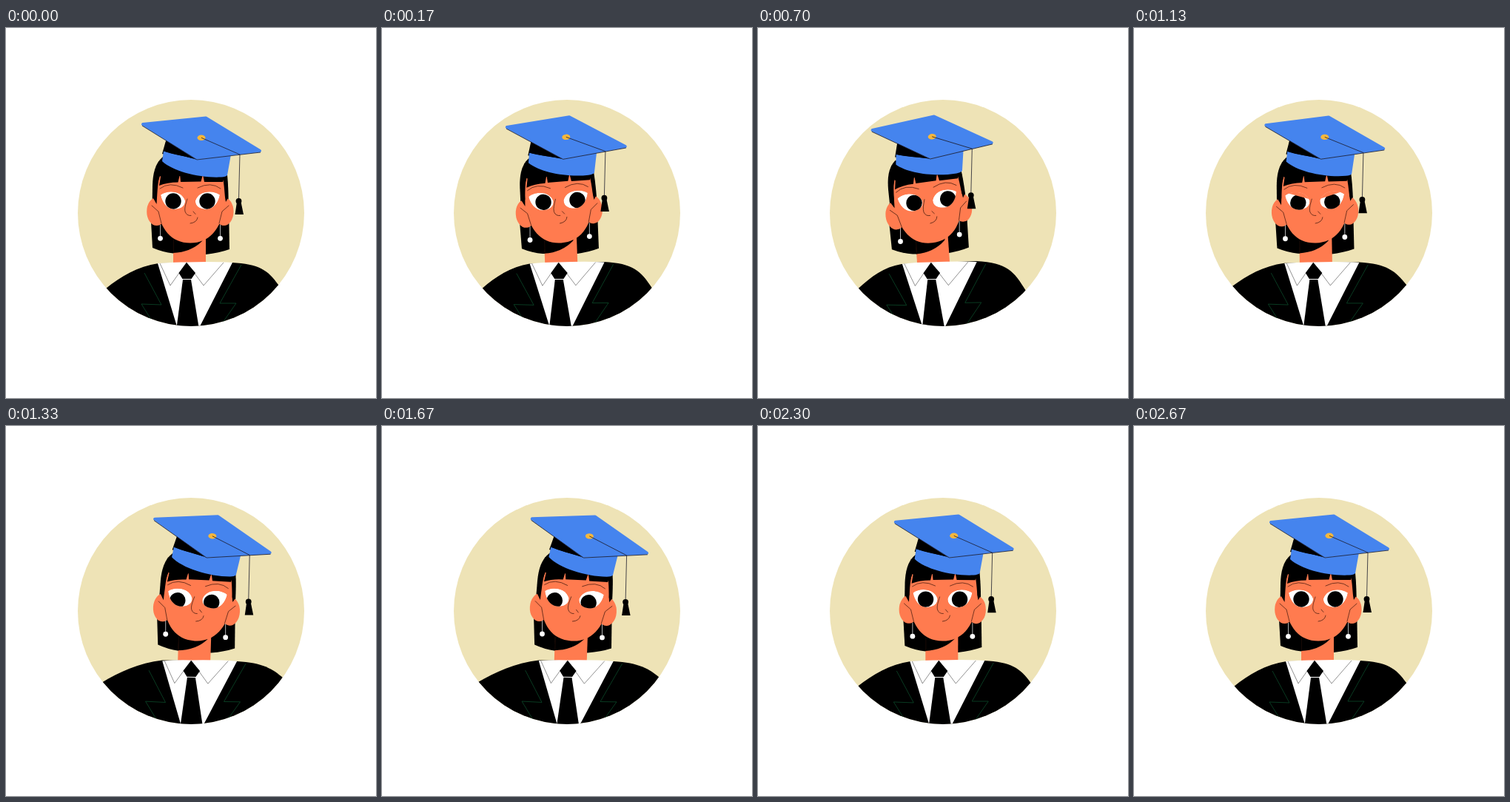
An HTML page for the animation above (2.93 s loop, 500 by 500 pixels).

```html
<!DOCTYPE html>
<html lang="en">
<head>
<meta charset="utf-8">
<title>Graduate</title>
<style>
  html, body { margin: 0; width: 100%; height: 100%; overflow: hidden; background: #fff; }
  svg { display: block; width: 100%; height: 100%; }
  .skin { fill: #ff7b4f; }
  .blue { fill: #4584ee; }
  .line { fill: none; stroke: #3a160c; stroke-width: .7; stroke-linecap: round; }
  .fold { fill: none; stroke: #222; stroke-width: .5; }
  .seam { fill: none; stroke: #0c4a2a; stroke-width: .8; }
  .cord { fill: none; stroke: #1c1c2c; stroke-width: .8; }
</style>
</head>
<body>
<svg viewBox="0 0 500 500">
  <defs>
    <clipPath id="disc"><circle cx="250" cy="250" r="153"/></clipPath>
    <path id="almond" d="M209 225.500C217 219 237 218.500 242 233C243 242 234 245.500 226 245C217 244 211 236 209 225.500Z"/>
    <clipPath id="eyeClip"><use href="#almond"/></clipPath>
    <clipPath id="eyeClip2"><use href="#almond" transform="matrix(-1 0 0 1 498 0)"/></clipPath>
  </defs>

  <circle cx="250" cy="250" r="153" fill="#eee3b6"/>

  <path id="backHair" d="M197 235L196 262L198 297Q212 303 226 304.500L270 306Q288 304 302 299L301 235Z"/>

  <g id="neck">
    <path class="skin" d="M226 265H270V322H226Z"/>
    <path d="M225.500 265V304Q250 303 265 288L270 276V265Z"/>
    <path class="line" d="M226.500 286V304" opacity=".6"/>
  </g>

  <g clip-path="url(#disc)">
    <path id="coat"/>
    <g id="shirt">
      <path fill="#fff" d="M205 318Q226 316 244 316.500Q280 315.500 306 317L257 413H234Z"/>
      <path class="fold" d="M208 318L222 348L244 317L267 348L294 317"/>
      <path d="M244 317L256 331L250.500 339H238.500L233.500 331Z"/>
      <path d="M239 340H250L262 413H229.500Z"/>
      <path class="seam" d="M187 331L210 374L183 373L203 405M318 320L289 372L311 372L288 405"/>
    </g>
  </g>

  <g id="head">
    <path d="M212 174C201 183 198.500 198 198 212L197.500 245H300.500C301 225 300 205 298 190Z"/>
    <ellipse class="skin" cx="203.500" cy="248" rx="13.300" ry="19"/>
    <ellipse class="skin" cx="294.500" cy="248" rx="13" ry="19"/>
    <path class="skin" d="M208 200H293L296 212V240C290 272 275 290.500 249 290.500C223 290.500 208 272 204 240V212Z"/>
    <path d="M199 205L207.500 200C204.500 212 204.500 225 203.500 238L199 230Z"/>
    <path d="M299 203L292 198C295.500 212 295 225 297 235L300 230Z"/>
    <path d="M206 180L298 190L293 208L268 208L266 198L263.500 207.500L236 208L235 198L232.500 208.500Q218 208.500 207 213L209 201L206 196Z"/>
    <path class="line" d="M208 217Q221 207 239 216M259 216Q277 207 290 217M197 240L206 248L210 264M301 240L292 248L288 264"/>

    <g clip-path="url(#eyeClip)">
      <use href="#almond" fill="#fff"/>
      <circle class="pupil" cx="226" cy="234" r="10.700"/>
      <path class="skin lid" d="M202 190H248V225L202 211Z"/>
    </g>
    <g clip-path="url(#eyeClip2)">
      <use href="#almond" transform="matrix(-1 0 0 1 498 0)" fill="#fff"/>
      <circle class="pupil" cx="272" cy="234" r="10.700"/>
      <path class="skin lid" d="M296 190H250V225L296 211Z"/>
    </g>

    <path class="line" d="M245 231C243 238 241 243 242 248Q244 254 250 253.500M253 248L256 251.500M249 264Q258 263 259 256"/>

    <g id="cap">
      <path d="M217 149L211 170L258 184V172Z"/>
      <path class="blue" d="M213 166C226 171 243 173 258 178L304 171L299 199Q297 201 291 201.500C262 203 226 194 211 180Z"/>
      <path d="M217 150L213 166.500C226 171 240 173 254 176.500Z"/>
      <path class="blue" stroke="#4584ee" stroke-width="4" stroke-linejoin="round" d="M185 130L270 121.500L343 166L258 176Z"/>
      <path class="cord" d="M184 132L258 178L344 168"/>
      <ellipse cx="264" cy="148.300" rx="5.500" ry="3.700" fill="#f6b73c"/>
      <path class="cord" d="M264 148.300L316 171"/>
    </g>
  </g>

  <g id="tassel">
    <path class="cord" d="M316 171L314.500 232"/>
    <circle cx="314.500" cy="233.800" r="3.900"/>
    <path d="M312 235H317.500L321 252H309.500Z"/>
  </g>
  <g id="ringL"><path d="M208.500 266V282" stroke="#ddd" stroke-width=".8"/><circle cx="208.500" cy="284.300" r="3.400" fill="#fff"/></g>
  <g id="ringR"><path d="M289.500 266V282" stroke="#ddd" stroke-width=".8"/><circle cx="289.500" cy="284.300" r="3.400" fill="#fff"/></g>
</svg>

<script>
const LOOP = 2930, TURN = 700, TO_RIGHT = 967, TO_CENTRE = 1955;
const $ = id => document.getElementById(id);
const pupils = document.querySelectorAll('.pupil');
const lids = document.querySelectorAll('.lid');

// Shoulder outline: left edge, curve to collar, collar end, curve to right edge
const coat = {
  centre: [135, 352, 155, 336, 178, 322, 206, 318, 305, 317, 342, 319, 354, 327, 368, 347],
  left:   [135.5, 352, 153, 336, 170, 323, 194, 319, 295, 315, 337, 317, 346, 329, 362, 355],
  right:  [130, 346, 152, 333, 180, 320, 212, 316.5, 313, 318, 347, 320, 361, 328, 375, 340]
};

const clamp = x => Math.min(1, Math.max(0, x));
const ease = x => x >= 1 ? 1 : 1 - Math.exp(-12.6 * x * x);
const smooth = x => (x = clamp(x), x * x * (3 - 2 * x));
const pulse = (t, a, b, c, d) => smooth((t - a) / (b - a)) * (1 - smooth((t - c) / (d - c)));

function move(el, x, y, turn = 0, cx = 0, cy = 0) {
  el.setAttribute('transform', `translate(${x} ${y}) rotate(${turn} ${cx} ${cy})`);
}

function draw(t) {
  // Weights of the left and right poses
  let l = 0, r = 0;
  if (t < TO_RIGHT) l = ease(t / TURN);
  else if (t < TO_CENTRE) { r = ease((t - TO_RIGHT) / TURN); l = 1 - r; }
  else r = 1 - ease((t - TO_CENTRE) / TURN);
  const mix = (a, b) => l * a + r * b;

  move($('backHair'), mix(-17, 8), 0, mix(-2.6, 1.7), 249, 300);
  move($('neck'), mix(-11, 6.8), 0, mix(-4, 2), 248, 316);
  move($('shirt'), mix(-10.2, 6.8), 0, mix(-1, 0.8), 250, 317);
  move($('head'), mix(-16.4, 8.6), 0, mix(-6.8, 3.8), 249, 262);
  move($('cap'), mix(1.2, 0.2), mix(-0.4, -0.7));
  move($('tassel'), mix(-26.7, 14.6), mix(-7.7, 4));
  move($('ringL'), mix(-16, 8), mix(4.2, -3.3));
  move($('ringR'), mix(-17.3, 8), mix(-5.2, 1.6));

  const p = coat.centre.map((c, i) => c + mix(coat.left[i] - c, coat.right[i] - c));
  $('coat').setAttribute('d',
    `M90 390L${p[0]} ${p[1]}C${p.slice(2, 8)}L${p[8]} ${p[9]}C${p.slice(10)}L410 395V420H90Z`);

  const look = smooth((t - 1600) / 300);
  const gx = mix(4.6, -3.8 + 5.5 * look), gy = mix(0, 3.3 + 0.5 * look);
  pupils.forEach(e => move(e, gx, gy));

  const shut = 13.5 * (pulse(t, 130, 300, 360, 560) + pulse(t, 1010, 1070, 1085, 1190));
  lids.forEach(e => move(e, 0, shut));
}

const start = performance.now();
function tick() {
  draw((performance.now() - start) % LOOP);
  requestAnimationFrame(tick);
}
tick();
</script>
</body>
</html>
```
